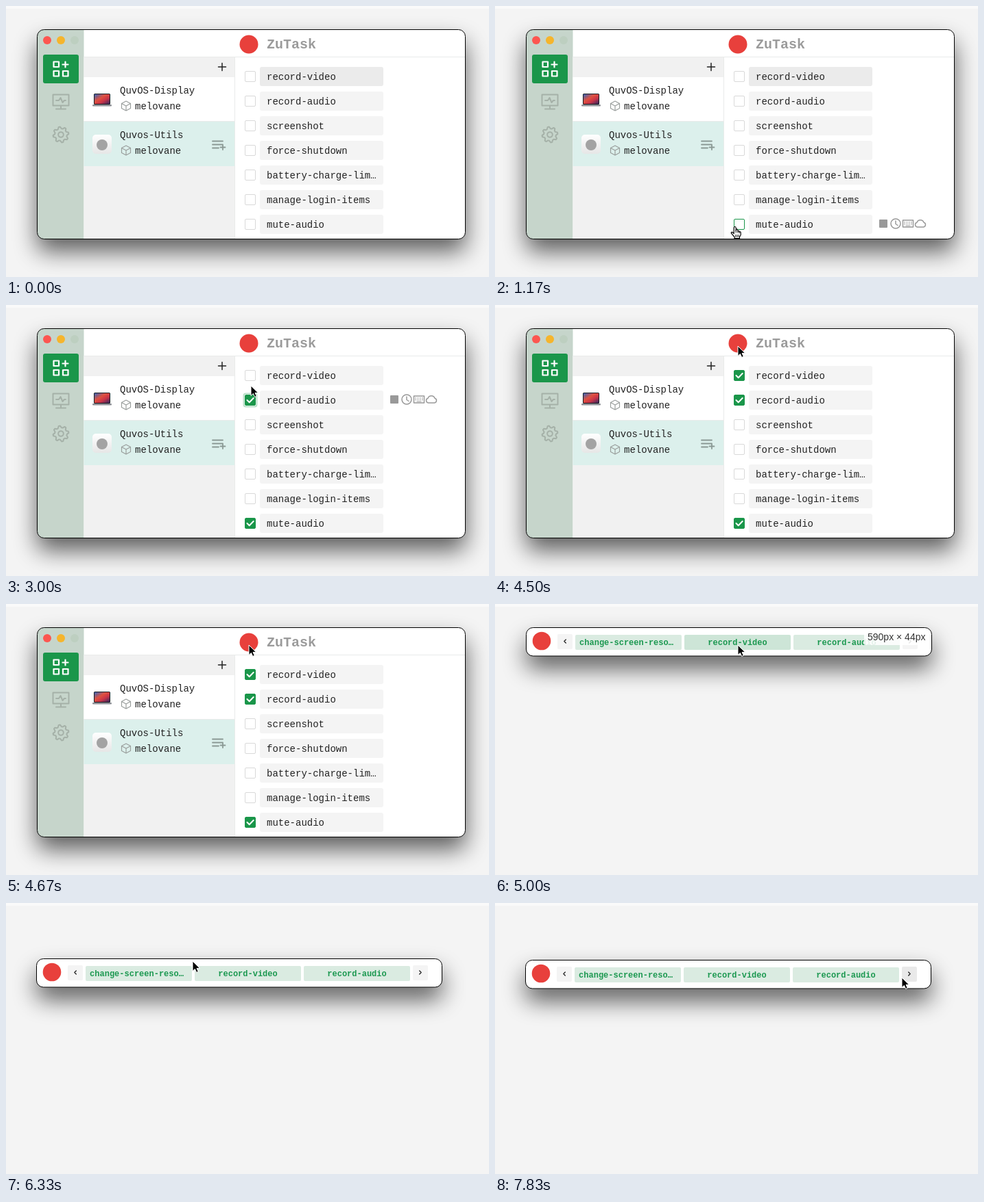
Recreate the animation shown at these times as an HTML page. Size 704 px wide and 396 px high, loop 8 s.

```html
<!DOCTYPE html>
<html lang="en">
<head>
<meta charset="utf-8">
<title>Task launcher</title>
<style>
  html, body { margin: 0; width: 100%; height: 100%; overflow: hidden; background: #f4f4f4; }
  svg { display: block; width: 100vw; height: 100vh; }
  text { font-family: "Liberation Mono", monospace; font-size: 14px; fill: #222; white-space: pre; }
  .title { font-size: 20px; font-weight: bold; fill: #9b9b9b; }
  .tab { font-size: 12px; font-weight: bold; fill: #1b9850; text-anchor: middle; }
  .size { font-family: "Liberation Sans", Arial, sans-serif; fill: #333; }
  .line { fill: none; stroke-linecap: round; stroke-linejoin: round; }
</style>
</head>
<body>
<svg id="stage" viewBox="0 0 704 396"></svg>
<script>
const GREEN = '#1a964a', RED = '#e8403c';
const LOOP = 8000, FPS = 6, STEPS = 48;
const CLICKS = { 6: 9, 1: 16, 0: 20 };   // row -> step of its click
const COLLAPSE = 29, SIZE_END = 33, FOCUS_END = 24;
const ROWS = ['record-video', 'record-audio', 'screenshot', 'force-shutdown',
  'battery-charge-lim…', 'manage-login-items', 'mute-audio'];
const TABS = ['change-screen-reso…', 'record-video', 'record-audio'];

// Each entry: step, x, y
const POINTER = [
  [3, 396, 384], [6, 350, 323], [10, 350, 323], [15, 352, 140], [17, 353, 138],
  [18, 357, 118], [20, 354, 105], [23, 354, 105], [25, 354, 60], [31, 354, 60],
  [34, 274, 38.5], [36, 273, 63], [37, 272, 77], [38, 272, 85], [39, 272, 87],
  [40, 272, 87], [43, 420, 100], [46, 593, 109]
];
const BAR = [[34, 45.5, 34.5], [36, 45, 59], [37, 44.5, 73], [38, 44.5, 81.5], [39, 44.5, 83.5]];

const rect = (x, y, w, h, fill, r = 0, more = '') =>
  `<rect x="${x}" y="${y}" width="${w}" height="${h}" rx="${r}" fill="${fill}" ${more}/>`;
const circle = (x, y, r, fill, more = '') =>
  `<circle cx="${x}" cy="${y}" r="${r}" fill="${fill}" ${more}/>`;
const text = (x, y, s, cls = '') => `<text x="${x}" y="${y}" class="${cls}">${s}</text>`;
const line = (d, color, w = 1.5) =>
  `<path class="line" d="${d}" stroke="${color}" stroke-width="${w}"/>`;
const group = (id, body, x = 0, y = 0) =>
  `<g id="${id}" transform="translate(${x} ${y})">${body}</g>`;
const at = (x, y, body) => `<g transform="translate(${x} ${y})">${body}</g>`;

const frame = (x, y, w, h, r) =>
  rect(x, y + 18, w, h, '#000', r, 'opacity=".62" filter="url(#blur)"') +
  rect(x, y, w, h, '#fff', r);
const outline = (x, y, w, h, r) => rect(x, y, w, h, 'none', r, 'stroke="#000"');

function gear(color) {
  let d = '';
  for (let i = 0; i < 32; i++) {
    const a = (i + .5) * Math.PI / 16, r = i % 4 < 2 ? 11.5 : 8.8;
    d += `${i ? 'L' : 'M'}${(r * Math.sin(a)).toFixed(1)} ${(r * Math.cos(a)).toFixed(1)}`;
  }
  return line(d + 'Z', color, 2) + circle(0, 0, 3.8, 'none', `stroke="${color}" stroke-width="2"`);
}

function sidebar() {
  const gray = '#a5b1a8';
  return rect(45.5, 34.5, 68, 306, '#c6d5cb') +
    circle(60, 50, 6, '#fc5650') + circle(80, 50, 6, '#f5b52c') + circle(100, 50, 6, '#bdcfc0') +
    rect(54, 71, 52, 42, GREEN, 3) +
    at(80, 92, line('M-10.500-10.500h7.500v7.500h-7.500zM-10.500 3h7.500v7.500h-7.500zM3 3h7.500v7.500h-7.500z' +
      'M6.500-10.500v8M2.500-6.500h8', '#fff', 2.2)) +
    at(80, 140, line('M-11.500-10.500h23v16h-23zM0 5.500v5M-7 10.500h14' +
      'M-7-2h4l2.500-4 3 7 2.500-3h2', gray, 2)) +
    at(80, 188, gear(gray));
}

const cube = (x, y) => at(x, y, line('M0-7L6.500-3.500V3.500L0 7L-6.500 3.500V-3.500ZM-6.500-3.500L0 0L6.500-3.500M0 0V7', '#9a9f9d', 1.2));

function library() {
  return rect(113.500, 75, 220, 266, '#f1f1f1') +
    rect(113.500, 104, 220, 64, '#fff') + rect(113.500, 168, 220, 66, '#dcf0ec') +
    line('M309.500 89h11M315 83.500v11', '#222', 1.5) +
    text(166, 128, 'QuvOS-Display') + cube(175, 146) + text(188, 151, 'melovane') +
    text(166, 193, 'Quvos-Utils') + cube(175, 211) + text(188, 216, 'melovane') +
    rect(128, 128, 24, 16, '#1b1b22', 1.5) + rect(129, 129, 22, 14, 'url(#screen)') +
    rect(126, 144, 28, 2.5, '#8d9096', 1) +
    rect(126, 188, 28, 28, 'url(#tile)', 5) + circle(140, 203, 8, '#a3a3a3') +
    at(309, 203, line('M-8-5.500H7M-8-.5H7M-8 4.500H1M7 0v7M3.500 3.500h7', '#8b9a95', 1.8));
}

function row(name, i) {
  return group('row' + i,
    rect(370, -14, 180, 28, '#f4f4f4', 3, 'class="pill"') + text(380, 5, name) +
    rect(346.5, -9.500, 19, 19, 'none', 3, `class="ring" stroke="${GREEN}" stroke-opacity=".3" stroke-width="2"`) +
    rect(348.5, -7.500, 15, 15, '#fff', 1.5, 'class="box"') +
    `<g class="tick">${line('M351.500 0l3.200 3.200 6-6.200', '#fff', 2)}</g>` +
    `<g class="tools">${tools()}</g>`, 0, 103 + 36 * i);
}

function tools() {
  const c = '#999';
  return rect(560, -7, 12, 12, c, 1) +
    at(584, -1, circle(0, 0, 7, 'none', `stroke="${c}" stroke-width="1.500"`) + line('M0-4V.5L3 2.500', c)) +
    at(602, -1, line('M-7.500-5h15v10h-15z', c) + line('M-5-2H5.500M-5 .5H5.500', c, 1.300).replace('<path', '<path stroke-dasharray=".5 2.700"') +
      line('M-3 3H3', c, 1.2)) +
    at(620, -1, line('M-4.500 5a3.500 3.500 0 0 1-.5-6.800a5.300 5.300 0 0 1 10 0a3.500 3.500 0 0 1-.5 6.800z', c));
}

function bigWindow() {
  return frame(45.5, 34.5, 624, 306, 10) +
    `<g clip-path="url(#win)">${sidebar()}${library()}` +
    line('M113.500 74.500H670M333.500 75V341M113.500 168.500H333', '#e9ebea', 1) +
    circle(354, 56, 13.5, RED) + text(380, 62, 'ZuTask', 'title') +
    ROWS.map(row).join('') + '</g>' + outline(45.5, 34.5, 624, 306, 10);
}

// Drawn relative to its top left corner
function bar() {
  const arrow = (id, x, d) => rect(x, 9.500, 22, 22, '#f4f4f4', 2, `id="${id}"`) +
    at(x + 11, 20, line(d, '#222', 1.3));
  return frame(0, 0, 591, 41.5, 10) + circle(22.5, 19.5, 13.300, RED) +
    arrow('prev', 45.5, 'M1.300-2.500L-1.200 0L1.300 2.500') +
    TABS.map((s, i) => rect(71.5 + 159 * i, 10.5, 155, 22, '#daebe1', 2, `id="tab${i}"`) +
      text(149 + 159 * i - (i ? 0 : 3), 25.500, s, 'tab')).join('') +
    arrow('next', 548.5, 'M-1.300-2.500L1.200 0L-1.300 2.500') +
    outline(0, 0, 591, 41.5, 10) +
    group('size', rect(492.5, 3.500, 94, 22, '#fff', 2, 'opacity=".88"') + text(497.5, 18.500, '590px × 44px', 'size'));
}

const arrowPointer = '<path d="M0 0V14.500L3.400 11.400L5.700 16.500L8.300 15.300L6 10.400H10.600Z" fill="#000" stroke="#fff" stroke-linejoin="round"/>';
const handPointer = '<path d="M-1.800 1C-1.800-1 1-1 1.200 1V5.500C2-.5 4 5 4 6.200C5 5 6.200 5.800 6.200 7C7.500 6.300 8.200 7.200 8.200 8.500V11.500L6.500 14.500V16.500H-1V14.500L-5.500 9.200C-6.300 7.800-4.500 6.800-3.400 8L-1.800 9.500Z" fill="#fff" stroke="#000" stroke-width="1.200" stroke-linejoin="round"/>' +
  line('M1.200 5.500V8M4 6.200V8.300M6.200 7V8.800M.8 11.500v3M3 11.500v3M5.200 11.500v3', '#000', .9);

const stage = document.getElementById('stage');
stage.innerHTML = `<defs>
  <filter id="blur" x="-40%" y="-200%" width="180%" height="500%"><feGaussianBlur stdDeviation="17"/></filter>
  <clipPath id="win">${rect(45.5, 34.5, 624, 306, '#fff', 10)}</clipPath>
  <linearGradient id="screen" x2="1" y2="1"><stop stop-color="#3566b8"/><stop offset=".4" stop-color="#e0513f"/>
    <stop offset=".65" stop-color="#c93448"/><stop offset="1" stop-color="#34275f"/></linearGradient>
  <linearGradient id="tile" x2="0" y2="1"><stop stop-color="#fff"/><stop offset="1" stop-color="#e6e6e6"/></linearGradient>
  </defs>` +
  rect(0, 0, 704, 396, '#f4f4f4') + rect(0, 0, 704, 4, '#fafafa') +
  group('window', bigWindow()) + group('bar', bar()) +
  group('pointer', group('arrow', arrowPointer) + group('hand', handPointer));

const $ = id => document.getElementById(id);
const show = (el, on) => { el.style.display = on ? '' : 'none'; };
const move = (el, [x, y]) => el.setAttribute('transform', `translate(${x} ${y})`);
const rows = ROWS.map((_, i) => {
  const part = name => $('row' + i).querySelector('.' + name);
  return { pill: part('pill'), ring: part('ring'), box: part('box'), tick: part('tick'), tools: part('tools') };
});

function along(path, k) {
  const i = path.findIndex(p => p[0] >= k);
  if (i < 0) return path[path.length - 1].slice(1);
  if (!i) return path[0].slice(1);
  const a = path[i - 1], b = path[i], f = (k - a[0]) / (b[0] - a[0]);
  return [a[1] + (b[1] - a[1]) * f, a[2] + (b[2] - a[2]) * f];
}

function drawRows(k, [x, y]) {
  // Row hover trails the pointer slightly
  const hover = k < POINTER[0][0] ? -1 : Math.floor((along(POINTER, k - .5)[1] - 85) / 36);
  let focus = -1, hand = false;
  for (const i in CLICKS) if (k >= CLICKS[i] && (focus < 0 || CLICKS[i] > CLICKS[focus])) focus = +i;
  rows.forEach((r, i) => {
    const over = i === hover && Math.abs(y - 103 - 36 * i) < 10 && Math.abs(x - 356) < 10;
    const on = k >= CLICKS[i];
    hand = hand || over;
    show(r.tools, i === hover);
    show(r.tick, on);
    show(r.ring, i === focus && k < FOCUS_END);
    r.box.setAttribute('fill', on ? GREEN : '#fff');
    r.box.setAttribute('stroke', on || over ? GREEN : '#d9d9d9');
    r.pill.setAttribute('fill', i === 0 && focus < 0 ? '#ebebeb' : '#f4f4f4');
  });
  return hand;
}

function drawBar(k, [x, y]) {
  const pos = along(BAR, k), px = x - pos[0], py = y - pos[1];
  const over = (left, w) => px >= left && px <= left + w && py >= 10 && py <= 32.5;
  move($('bar'), pos);
  TABS.forEach((_, i) => $('tab' + i).setAttribute('fill', over(71.5 + 159 * i, 155) ? '#cde5d7' : '#daebe1'));
  $('next').setAttribute('fill', over(548.5, 22) ? '#e9e9e9' : '#f4f4f4');
  show($('size'), k < SIZE_END);
}

function draw(t) {
  const k = Math.min(STEPS - 1, Math.floor((t + 4) * FPS / 1000));
  const pos = along(POINTER, k), small = k >= COLLAPSE;
  let hand = false;
  show($('window'), !small);
  show($('bar'), small);
  if (small) drawBar(k, pos); else hand = drawRows(k, pos);
  move($('pointer'), pos);
  show($('pointer'), k >= POINTER[0][0]);
  show($('hand'), hand);
  show($('arrow'), !hand);
}

const start = performance.now();
function tick() {
  draw((performance.now() - start) % LOOP);
  requestAnimationFrame(tick);
}
tick();
</script>
</body>
</html>
```
